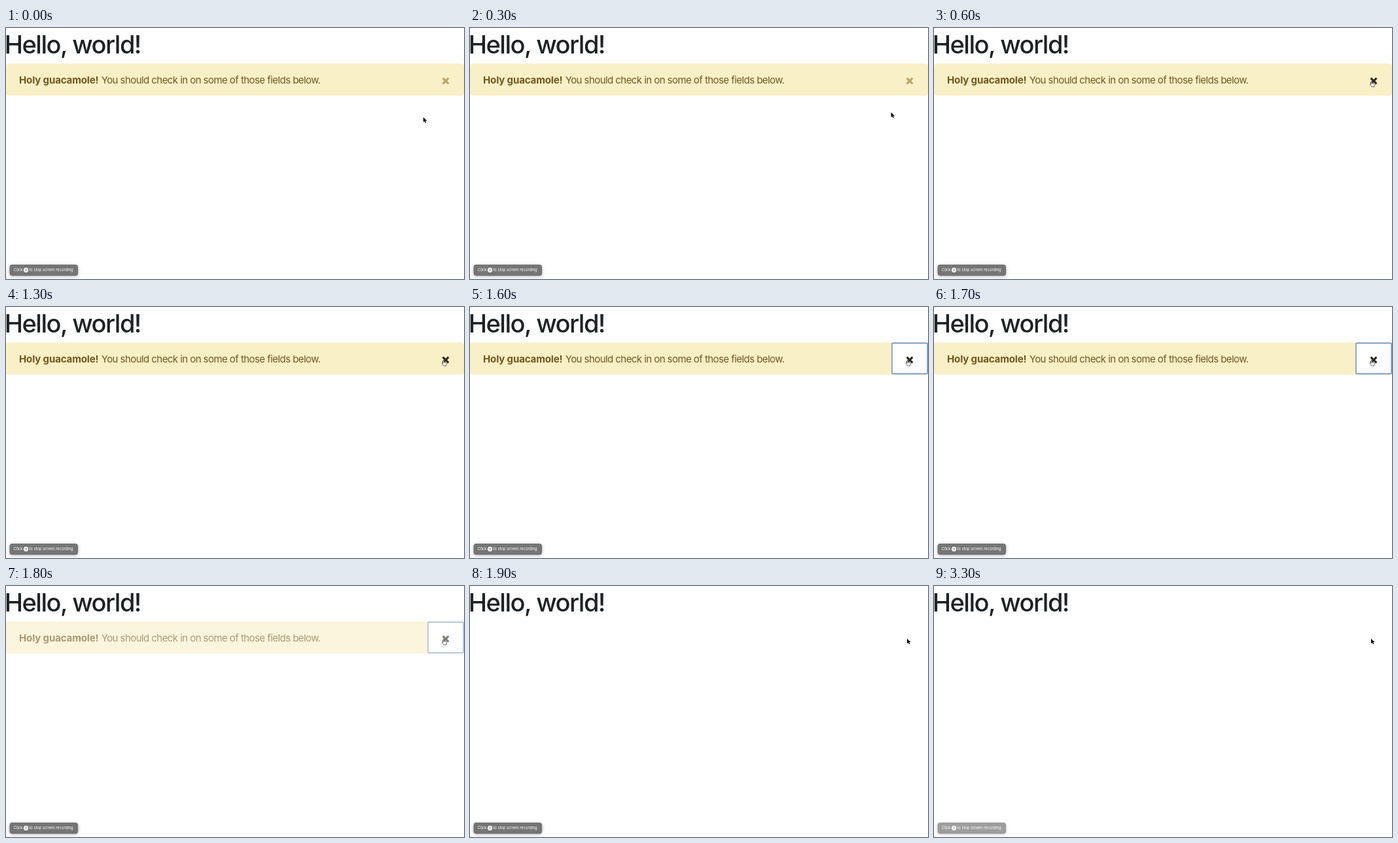
Write an HTML page that moves like this. It is 700 by 384 pixels and loops after 3400 ms.

```html
<!DOCTYPE html>
<html lang="en">
<head>
<meta charset="utf-8">
<title>Dismissible alert</title>
<style>
  html, body { margin: 0; height: 100%; overflow: hidden; background: #fff; }
  svg { display: block; width: 700px; height: 384px; }
  text { font-family: Inter, sans-serif; font-optical-sizing: none; white-space: pre; }
  h1, .title { font-size: 38px; font-weight: 500; letter-spacing: -1.5px; fill: #1f2225; }
  .message { font-size: 15px; letter-spacing: -.56px; fill: #72561b; }
  .strong { font-weight: 700; letter-spacing: -.12px; }
  .badge { filter: drop-shadow(0 1.5px 2.5px #0005); }
  .badge text { font-size: 5.8px; fill: #fff; }
</style>
</head>
<body>
<svg viewBox="0 0 700 384">
  <text class="title" x="-2.3" y="38.5">Hello, world!</text>

  <g id="alert">
    <rect x=".5" y="55" width="699" height="48" rx="3.5" fill="#faf0c8" stroke="#fbedbf"/>
    <text class="message strong" x="20" y="85">Holy guacamole!</text>
    <text class="message" x="145.7" y="85">You should check in on some of those fields below.</text>
    <rect id="focus" x="645" y="55.3" width="54.2" height="47" rx="1" fill="#fff" stroke="#5f89b8" stroke-width="1.4"/>
    <path id="close" d="M667.6 76.6l8.8 8.8m0-8.8l-8.8 8.8" stroke-width="3"/>
  </g>

  <g id="badge" class="badge">
    <rect x="6" y="362.5" width="103.5" height="16" rx="3" fill="#757575" stroke="#626262" stroke-width=".8"/>
    <text x="12" y="372.3">Click</text>
    <circle cx="30.5" cy="370.3" r="3.6" fill="#fff"/>
    <path d="M29.4 369.2l2.2 2.2m0-2.2l-2.2 2.2" stroke="#555" stroke-width="1"/>
    <text x="35.5" y="372.3">to stop screen recording</text>
  </g>

  <g id="cursor" stroke-linejoin="round">
    <path id="arrow" d="M0 0v7.6l1.8-1.6 1.2 2.7 1.3-.6-1.2-2.6h2.4z" fill="#000" stroke="#fff" stroke-width=".7" paint-order="stroke"/>
    <path id="hand" d="M0 1.2q.8-1 1.6 0v2.9l3 .7q1 .3 1 1.4l-.7 3.2h-3.9l-2.6-3.3q-.1-1.2 1.6-.2z" fill="#fff" stroke="#222" stroke-width=".7"/>
  </g>
</svg>
<script>
  const LOOP = 3400, STEP = 100;
  const $ = id => document.getElementById(id);
  const show = (id, on) => $(id).setAttribute('visibility', on ? 'inherit' : 'hidden');
  const mix = (a, b, k) => a + (b - a) * k;

  function cursorAt(t) {
    if (t < 100) return [637.8, 136.5];
    const u = Math.min(1, Math.max(0, (t - 200) / 400));
    const k = u * u * (3 - 2 * u);
    return [mix(639, 668, k), mix(138, 80.5, k)];
  }

  function render(t) {
    const [x, y] = cursorAt(t);
    const open = t < 1900;
    const hover = open && y < 103;

    $('cursor').setAttribute('transform', `translate(${x} ${y})`);
    show('arrow', !hover);
    show('hand', hover);

    show('alert', open);
    $('alert').setAttribute('opacity', t < 1800 ? 1 : .6);
    show('focus', open && t >= 1600);
    $('close').setAttribute('stroke', hover ? '#2c2620' : '#b7a56c');

    $('badge').setAttribute('opacity', t < 3300 ? 1 : .7);
  }

  const start = performance.now();
  function tick() {
    const t = (performance.now() - start) % LOOP;
    render(Math.floor(t / STEP) * STEP);
    requestAnimationFrame(tick);
  }
  tick();
</script>
</body>
</html>
```
